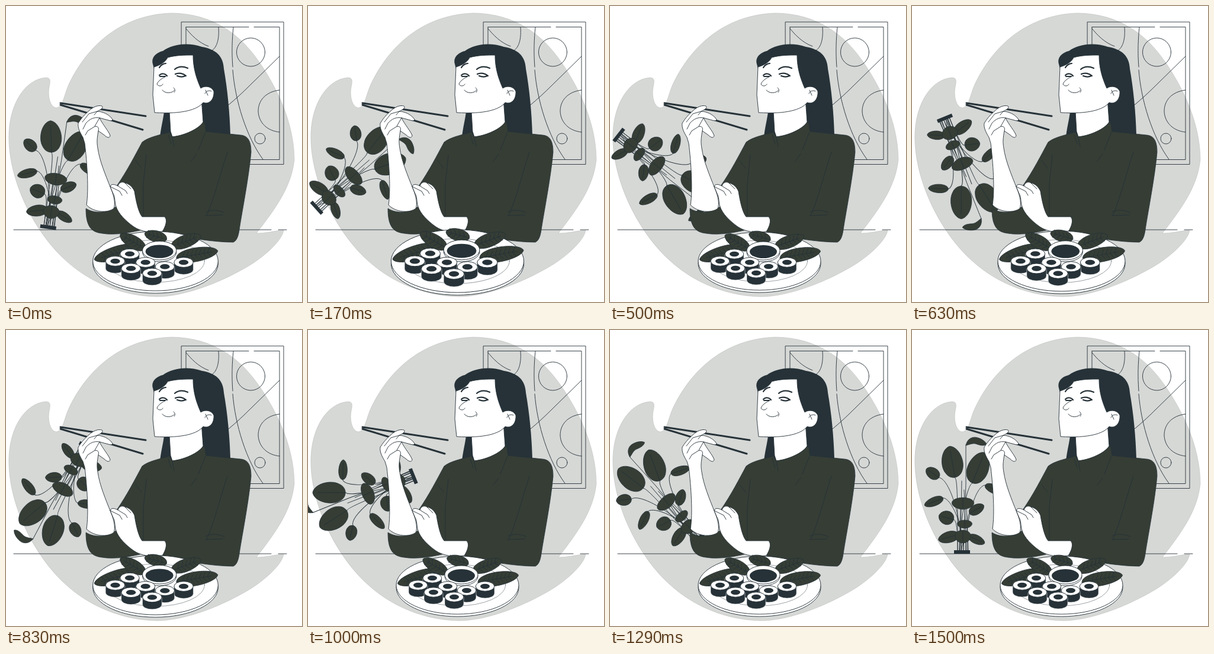
These frames come from a looping animation (500 px wide and 500 px high, 1.54 s). An HTML page:

```html
<!DOCTYPE html>
<html lang="en">
<head>
<meta charset="utf-8">
<title>Sushi dinner</title>
<style>
html, body { margin: 0; width: 100%; height: 100%; overflow: hidden; background: #fff; }
svg { display: block; width: 100%; height: 100%; }
.line { fill: none; stroke: #263238; stroke-width: .9; stroke-linecap: round; stroke-linejoin: round; }
.skin { fill: #fff; stroke: #263238; stroke-width: .9; stroke-linejoin: round; }
.ink { fill: #263238; }
.green { fill: #353d35; stroke: #263238; stroke-width: .8; }
</style>
</head>
<body>
<svg viewBox="0 0 500 500">
  <path fill="#d6d8d6" stroke="#b4b8b5" stroke-width=".5" d="M5 214C7 165 32 124 67 121C76 121 75 127 73 137C70 153 75 171 85 172C96 171 98 151 105 135C126 88 178 15 280 12C350 13 396 48 428 95C455 134 487 195 487 260C482 305 457 340 423 384C440 384 455 379 469 379C466 397 435 425 405 442C360 468 300 491 255 491C198 490 142 468 100 429C46 380 2 290 5 214Z"/>

  <g class="line">
    <path d="M296.500 27H469V267.500H296.500Z M304 35.500H410M419 35.500H462V259.500H304V35.500"/>
    <circle cx="413.500" cy="78" r="24"/>
    <circle cx="429" cy="224" r="9"/>
    <path d="M462 142C438 145 426 160 426 178C427 197 441 211 462 213M384 36C382 55 381 78 383 103M383 108C387 160 406 221 434 259M462 85L412 134C400 146 388 157 376 167M359 36C361 60 354 77 341 77M304 38C312 48 325 62 342 68"/>
    <path d="M13 378H448M460 378H474"/>
  </g>

  <g id="plant"></g>

  <g id="woman">
    <path class="ink" d="M248 98C245 87 253 79 265 76C282 64 307 61 331 69C354 73 367 84 368 106C374 140 378 180 379 218L325 216L277 222H260C261 208 266 190 267 178Z"/>
    <path class="skin" d="M276 178L278 212L281 221C303 219 325 208 333 196L330 155Z"/>
    <path class="skin" d="M250 103C261 100 270 94 273 87C288 83 301 83 316 83C316 104 321 121 329 139C334 135 346 134 351 144C352 157 344 167 333 163C324 175 298 183 251 180L248 150Z"/>
    <path class="line" d="M270 119C264 122 257 126 255 132C258 137 264 135 265 132M264 142C270 149 280 147 284 143M283 138C286 140 286 144 284 146M336 148C338 143 344 142 347 144M337 142L341 151"/>
    <path class="line" stroke-width="2.200" style="stroke-width:2.2" d="M259 104C261 100 266 97 270 97M285 107C292 101 300 102 307 105M259 117C263 113 269 114 272 118M286 115C292 112 300 114 304 118M289 118C294 120 299 120 303 118M260 119L269 119"/>
    <path class="green" d="M276 213C255 219 240 222 230 230C218 252 205 278 187 304L205 340L230 357H269L264 381C300 391 350 399 384 399C391 396 393 385 394 378C400 340 410 290 414 247C414 227 408 219 396 218L338 212C336 206 338 200 334 196C325 208 300 219 281 221Z"/>
    <path class="green" d="M135 342C150 352 174 349 187 338C200 355 216 369 238 376C215 382 185 388 162 384C143 382 135 371 135 342Z"/>
    <path class="line" d="M237 252L232 300V355M374 247C362 282 353 322 339 354M338 348C348 343 360 345 369 349M337 354L366 353M274 217L279 233M281 222L284 238M337 213L325 243M322 250L313 262M219 261L229 274"/>
    <path class="line" style="stroke-width:3" d="M92 164L236 186M92 167L231 209"/>
    <path class="skin" d="M133 232L130 222C124 212 121 205 122 198C127 190 132 184 139 178C147 170 156 167 162 169C165 171 161 175 154 178C163 178 173 183 178 189C182 193 178 195 173 193L158 189C163 200 174 212 176 219C175 224 170 222 166 218L156 211C154 222 153 230 155 240C158 262 168 285 177 308C183 322 185 335 182 342C172 350 148 349 136 336C140 310 137 265 133 232Z"/>
    <path class="line" d="M154 178L140 182L129 196M158 189C149 187 141 191 135 198L130 208M156 211C158 204 153 202 149 204L138 211L134 218M158 189L150 203M154 178L149 184"/>
    <path class="skin" d="M176 305C178 299 185 302 189 304C192 296 198 297 201 299C208 300 214 306 217 313C220 332 224 349 230 356H268C273 361 270 372 264 381C245 384 228 381 216 373C202 363 190 351 186 339C183 331 185 323 181 317Z"/>
    <path class="line" d="M176 305L192 313L196 320M189 304L202 312L205 317M201 299L211 309"/>
  </g>

  <g id="plate"></g>
</svg>
<script>
const DURATION = 1540, SPIN = 1500, LEAD = 33.3, STEP = 1000 / 24;
const plant = document.getElementById('plant');
const plate = document.getElementById('plate');

const line = d => `<path class="line" d="${d}"/>`;
const ellipse = (x, y, rx, ry, cls) => `<ellipse class="${cls}" cx="${x}" cy="${y}" rx="${rx}" ry="${ry}"/>`;

// An egg-shaped leaf pointing up before it is turned; r and w are half sizes.
const leaf = ([x, y, r, w, turn]) => `<g transform="translate(${x} ${y}) rotate(${turn})">
  <path class="green" d="M0 ${-r}C${w * .9} ${-r * .9} ${w * 1.3} ${r * .1} ${w * .85} ${r * .6}C${w * .5} ${r * 1.1} ${-w * .5} ${r * 1.1} ${-w * .85} ${r * .6}C${-w * 1.3} ${r * .1} ${-w * .9} ${-r * .9} 0 ${-r}Z"/>
  ${line(`M0 ${-r * .7}V${r}`)}</g>`;

const plantLeaves = [
  [68, 223, 27, 17, -10], [112, 233, 28, 17, 22], [35, 242, 13, 9, -55], [37, 290, 17, 7, -112],
  [139, 269, 17, 7, 114], [109, 303, 14, 8, 60], [58, 317, 13, 11, -75], [62, 350, 18, 9, -105],
  [109, 354, 15, 7, 115], [86, 349, 11, 13, 180], [86, 293, 10, 18, 180], [89, 328, 7, 12, 180]
];
const stem = ([x, y, r, , turn], i) => {
  const a = turn * Math.PI / 180, foot = 77 + i % 6 * 3.4;
  const bx = x - Math.sin(a) * r, by = y + Math.cos(a) * r;
  return line(`M${foot} 374C${foot} ${(by + 374) / 2} ${85 + (bx - 85) * .6} ${by} ${bx} ${by}`);
};
plant.innerHTML = plantLeaves.slice(0, 9).map(stem).join('')
  + line('M87 373L91 260V194M82 373L84 255M92 373L88 270M80 373L82 300M95 373L92 300')
  + '<path class="green" d="M91 195C93 184 102 179 111 182C118 184 124 188 126 193C121 197 113 194 107 192C101 191 96 194 91 195Z"/>'
  + plantLeaves.map(leaf).join('')
  + '<path class="ink" d="M71 372H98V378H71Z"/>';

const plateLeaves = [
  [188, 418, 38, 11, -106], [215, 399, 24, 10, -60], [253, 390, 19, 9, -75],
  [303, 398, 26, 10, 70], [321, 420, 35, 11, 80]
];
const plateLeaf = p => {
  const [x, y, r, w, turn] = p;
  let veins = '';
  for (let v = -r * .5; v < r * .8; v += 7) veins += `M0 ${v}L${w * .7} ${v - 5}M0 ${v}L${-w * .7} ${v - 5}`;
  return leaf(p) + `<g transform="translate(${x} ${y}) rotate(${turn})">${line(veins)}</g>`;
};
const roll = ([x, y]) =>
  `<path class="ink" stroke="#fff" stroke-width=".5" d="M${x - 16} ${y}v12a16 8 0 0 0 32 0v-12z"/>`
  + ellipse(x, y, 15.8, 8.2, 'skin') + ellipse(x, y, 8, 4.2, 'ink');

plate.innerHTML = ellipse(252.5, 435, 103.5, 49, 'skin') + ellipse(252.5, 431, 103.5, 49, 'skin')
  + `<g opacity=".5">${ellipse(252.5, 431, 81, 35, 'line')}</g>`
  + plateLeaves.map(plateLeaf).join('')
  + ellipse(259, 416, 28, 16, 'skin') + ellipse(259, 413.5, 28, 15.5, 'skin') + ellipse(259, 415, 23, 11, 'ink')
  + [[210, 419], [186, 431], [236, 433], [299, 433], [268, 440], [212, 443], [247, 451]].map(roll).join('');

// Two linear beats, then rest.
const beats = [[0, 0], [.1, 1], [.3, 0], [.4, 0], [.5, 1], [.6, 0], [1, 0]];
function beat(p) {
  const i = Math.max(1, beats.findIndex(b => b[0] >= p));
  const [p0, v0] = beats[i - 1], [p1, v1] = beats[i];
  return 1 + .1 * (v0 + (v1 - v0) * (p - p0) / (p1 - p0));
}

function draw() {
  const time = performance.now() % DURATION;
  const tick = Math.min(36, Math.floor((time + 5) / STEP));
  const p = Math.min(1, (tick * STEP + LEAD) / SPIN);
  plant.setAttribute('transform', `rotate(${p * 360} 88 279.5)`);
  plate.setAttribute('transform', `translate(252.5 432) scale(${beat(p)}) translate(-252.5 -432)`);
  requestAnimationFrame(draw);
}
draw();
</script>
</body>
</html>
```
